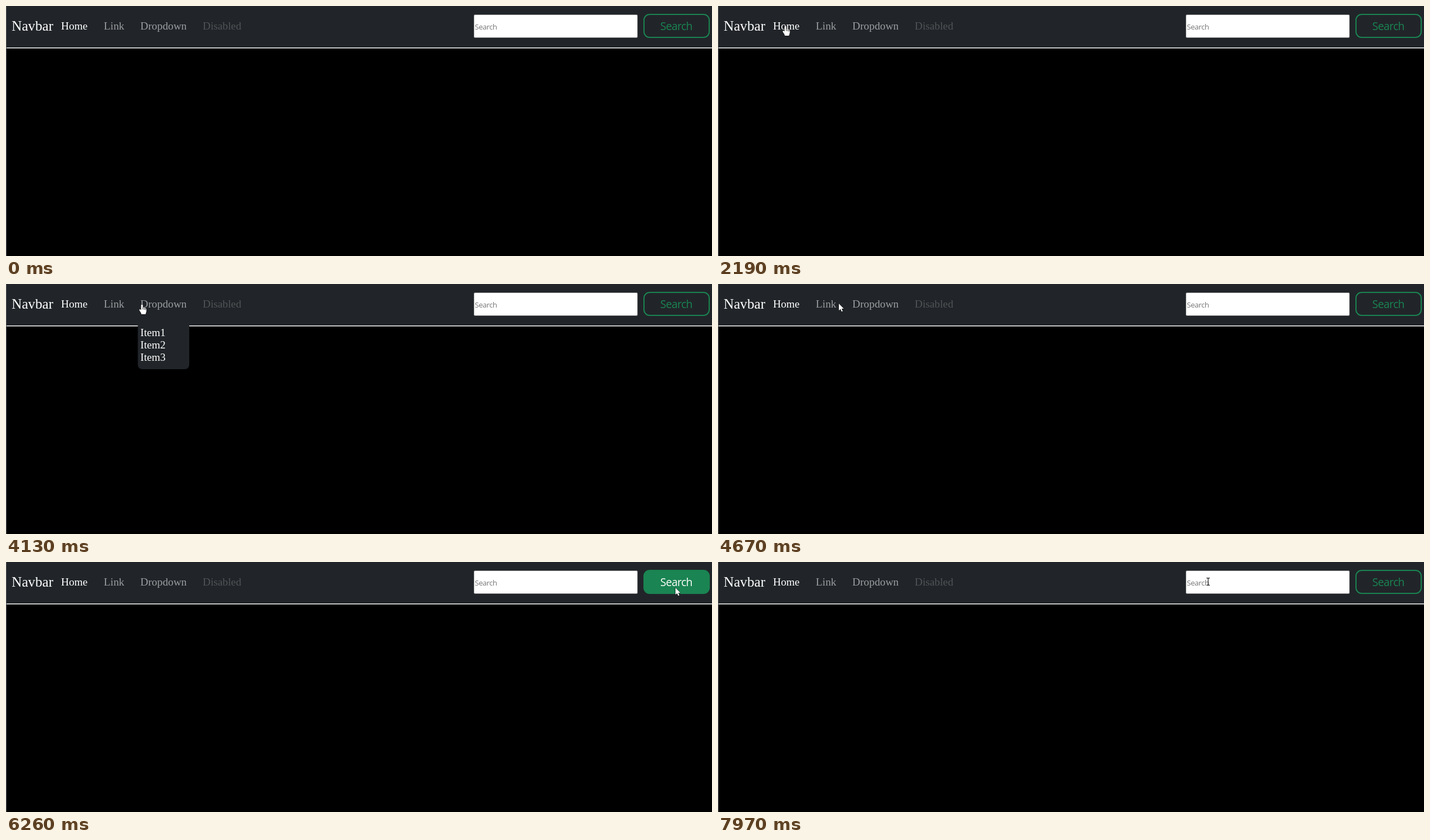
Recreate the animation shown at these times as an HTML page. Size 1256 by 446 pixels, loop 8000 ms.

```html
<!DOCTYPE html>
<html lang="en">
<head>
<meta charset="utf-8">
<title>Navbar</title>
<style>
  html, body { margin: 0; width: 100%; height: 100%; overflow: hidden; background: #000; }
  svg { display: block; width: 1256px; height: 446px; }
  .serif { font: 19.3px "Liberation Serif", "Times New Roman", serif; fill: #fff; }
  .brand { font-size: 25.2px; }
  .muted { fill: #9b9da0; }
  .off { fill: #515356; }
  .sans { font-family: "Open Sans", "Noto Sans", sans-serif; }
  .hint { font-size: 13.3px; letter-spacing: -.03em; fill: #757575; }
  .label { font-size: 19.2px; letter-spacing: -.03em; text-anchor: middle; fill: #1a8452; }
  .btn { fill: none; stroke: #1a8452; stroke-width: 2; }
  .hover .btn { fill: #1a8452; }
  .hover .label { fill: #fff; }
  .cursor path { fill: #fff; stroke: #000; paint-order: stroke; stroke-linejoin: round; }
  .cursor .line { fill: none; stroke-width: .8; }
  #beam .line { stroke: #222; stroke-width: 1.3; }
</style>
</head>
<body>
<svg viewBox="0 0 1256 446">
  <rect width="1256" height="446" fill="#000"/>
  <rect width="1256" height="74" fill="#212529"/>
  <rect y="74" width="1256" height="1.5" fill="#fff"/>
  <rect width="1" height="446" fill="#55585b"/>

  <g class="serif">
    <text class="brand" x="10" y="44">Navbar</text>
    <text x="98" y="42">Home</text>
    <text class="muted" x="174" y="42">Link</text>
    <text class="muted" x="239" y="42">Dropdown</text>
    <text class="off" x="350" y="42">Disabled</text>
  </g>

  <g id="menu" class="serif">
    <path d="M234.500 72H326V143Q326 152 317 152H243.500Q234.500 152 234.500 143Z" fill="#212529"/>
    <text x="239" y="93">Item1</text>
    <text x="239" y="115">Item2</text>
    <text x="239" y="137">Item3</text>
  </g>

  <g class="sans">
    <rect x="832.500" y="15.500" width="291" height="41" rx="2" fill="#fff" stroke="#767676"/>
    <text class="hint" x="834" y="41.500">Search</text>
    <g id="search">
      <rect class="btn" x="1135" y="15" width="116" height="41" rx="10"/>
      <text class="label" x="1192.500" y="42.800">Search</text>
    </g>
  </g>

  <g id="arrow" class="cursor">
    <path d="M0 0V12.300L2.900 9.700L4.900 14.300L6.900 13.400L5 9H8.800Z"/>
  </g>
  <g id="hand" class="cursor">
    <path d="M-1.600 10.500V1.600Q0-.6 1.500 1.600V6Q3.400 5 4 6.800Q5.600 6 6.200 7.600Q7.800 7.200 7.800 9.200V12.500Q7.400 15 6.200 18H-1Q-1.600 15.400-4.500 11.600Q-5.400 8.800-3.300 9.100Z"/>
    <path class="line" d="M1.500 6V9.500M4 7V10M6.200 8V10.500"/>
  </g>
  <g id="beam" class="cursor">
    <path class="line" d="M-3-6.300H-1Q0-6.300 0-5.300Q0-6.300 1-6.300H3M0-5.500V5.500M-3 6.300H-1Q0 6.300 0 5.300Q0 6.300 1 6.300H3"/>
  </g>
</svg>
<script>
  const LOOP = 8000, STEP = 67;
  const byId = id => document.getElementById(id);
  const menu = byId("menu"), search = byId("search");
  const cursors = { arrow: byId("arrow"), hand: byId("hand"), beam: byId("beam") };

  // Each sweep bends from the last resting point, past `bend`, to `to`.
  const entry = [1160, 430];
  const sweeps = [
    { start: 590, end: 1360, bend: [640, 230], to: [137, 125] },
    { start: 1430, end: 1780, bend: [90, 70], to: [54, 31] },
    { start: 1920, end: 2660, bend: [134, 38], to: [213, 34] },
    { start: 2730, end: 3060, bend: [306, 37], to: [285, 38] },
    { start: 3460, end: 3660, bend: [284, 38], to: [283, 38] },
    { start: 3990, end: 4670, bend: [192, 34], to: [216, 35] },
    { start: 4740, end: 4870, bend: [259, 36], to: [273, 35] },
    { start: 5140, end: 5910, bend: [1326, 136], to: [1191, 46] },
    { start: 5980, end: 6520, bend: [1192, 46], to: [1190, 47] },
    { start: 6790, end: 7330, bend: [940, 130], to: [775, 62] },
    { start: 7400, end: 7550, bend: [800, 38], to: [871, 35] },
    { start: 7620, end: 7970, bend: [877, 34], to: [872, 35] }
  ];

  const curve = (a, b, c, u) => (1 - u) ** 2 * a + 2 * u * (1 - u) * b + u * u * c;

  // The pointer moves in discrete steps, the first one at the sweep's start.
  function pointer(t) {
    const i = sweeps.filter(s => s.start <= t).length - 1;
    if (i < 0) return null;
    const { start, end, bend, to } = sweeps[i];
    const from = i ? sweeps[i - 1].to : entry;
    const steps = Math.floor((t - start + 4) / STEP) + 1;
    const u = Math.min(1, steps * STEP / (end - start + STEP));
    return from.map((v, axis) => Math.round(curve(v, bend[axis], to[axis], u)));
  }

  const inside = (p, x0, y0, x1, y1) =>
    p !== null && p[0] >= x0 && p[0] <= x1 && p[1] >= y0 && p[1] <= y1;

  const show = (el, on) => el.setAttribute("visibility", on ? "visible" : "hidden");

  function render(t) {
    const p = pointer(t);
    const open = inside(p, 235, 24, 326, 72);
    const onLink = open || [[10, 84], [98, 146], [174, 214]]
      .some(([x0, x1]) => inside(p, x0, 24, x1, 48));
    const kind = onLink ? "hand" : inside(p, 833, 16, 1123, 56) ? "beam" : "arrow";

    show(menu, open);
    search.setAttribute("class", inside(p, 1134, 14, 1252, 57) ? "hover" : "");
    for (const [name, el] of Object.entries(cursors)) {
      show(el, p !== null && name === kind);
      if (p) el.setAttribute("transform", `translate(${p[0]} ${p[1]})`);
    }
  }

  function frame() {
    render(performance.now() % LOOP);
    requestAnimationFrame(frame);
  }
  frame();
</script>
</body>
</html>
```
